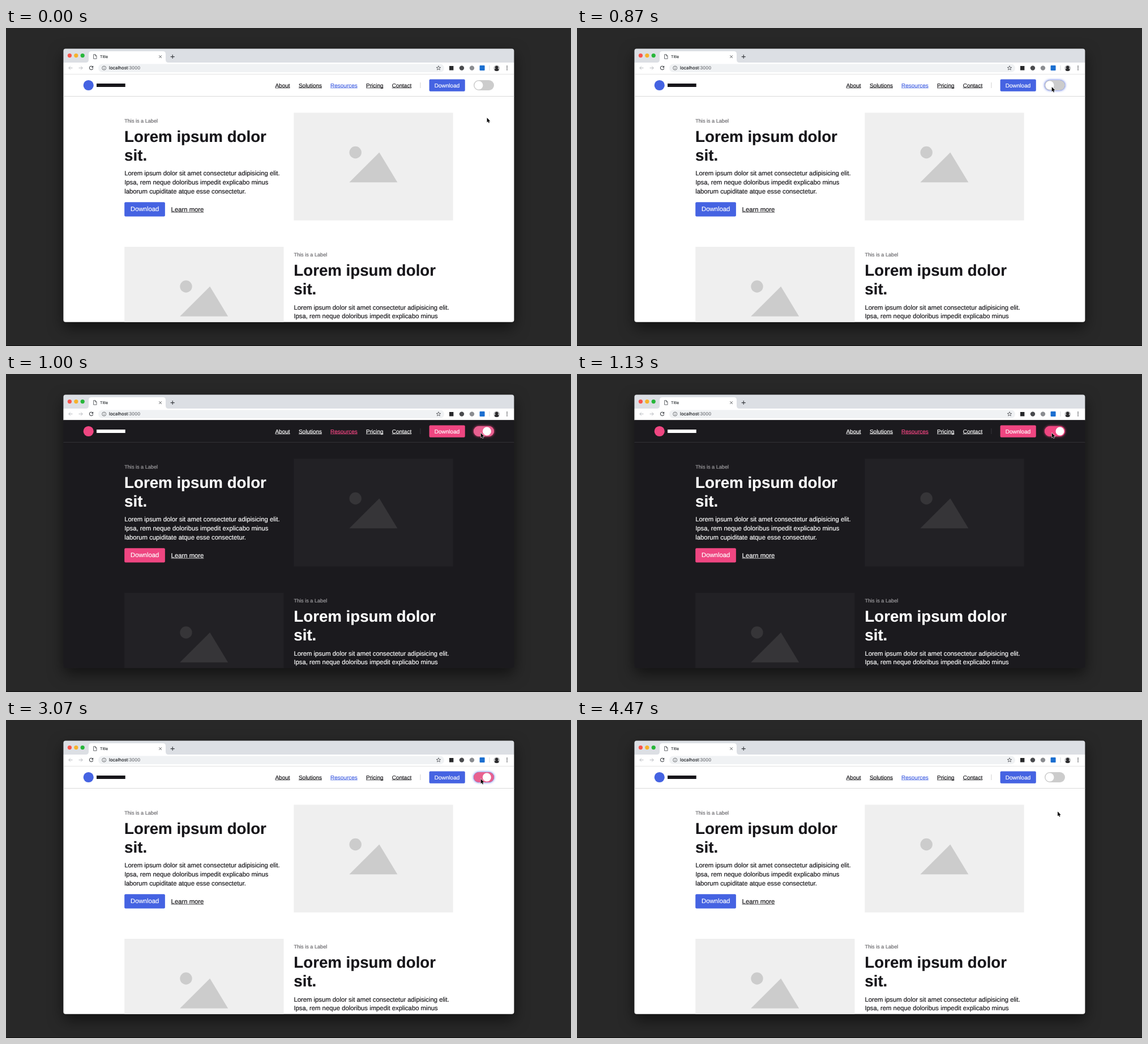
Write an HTML page with a canvas that moves like this. It is 998 px wide and 561 px high and loops after 4800 ms.

```html
<!DOCTYPE html>
<html lang="en">
<head>
<meta charset="utf-8">
<title>Theme toggle</title>
<style>
  html, body { margin: 0; width: 100%; height: 100%; overflow: hidden; background: #282828; }
  canvas { display: block; width: 998px; height: 561px; }
</style>
</head>
<body>
<canvas id="stage" width="998" height="561"></canvas>
<script>
const ctx = document.getElementById('stage').getContext('2d');
const LOOP = 4800, STEP = LOOP / 72, LEAD = 15;
const WIN = [101.4, 36.6, 796, 482.2, 4];
const SANS = '"Liberation Sans", Arial, sans-serif';
const UI = 'Inter, Roboto, sans-serif';

const LIGHT = {
  bg: '#ffffff', text: '#17161a', accent: '#4563e2', label: '#69686c',
  line: '#cccccc', box: '#efefef', shape: '#cccccc'
};
const DARK = {
  bg: '#1b1a1e', text: '#ffffff', accent: '#ef4681', label: '#a09fa2',
  line: '#39383c', box: '#222125', shape: '#363538'
};

const clamp = u => Math.max(0, Math.min(1, u));
const mix = (a, b, u) => a + (b - a) * u;
const inOut = u => u < 0.5 ? 4 * u ** 3 : 1 - 4 * (1 - u) ** 3;

// The CSS "ease" curve, solved by bisection.
function ease(u) {
  let lo = 0, hi = 1, s = 0.5;
  for (let i = 0; i < 20; i++) {
    s = (lo + hi) / 2;
    if (0.75 * s * (1 - s) + s ** 3 < u) lo = s; else hi = s;
  }
  return 0.3 * (1 - s) ** 2 * s + 3 * (1 - s) * s * s + s ** 3;
}

function rect(x, y, w, h, fill, r = 0) {
  ctx.fillStyle = fill;
  ctx.beginPath();
  ctx.roundRect(x, y, w, h, r);
  ctx.fill();
}

function disc(x, y, r, fill) {
  ctx.fillStyle = fill;
  ctx.beginPath();
  ctx.arc(x, y, r, 0, Math.PI * 2);
  ctx.fill();
}

function poly(points, fill) {
  ctx.fillStyle = fill;
  ctx.beginPath();
  points.forEach(([x, y]) => ctx.lineTo(x, y));
  ctx.closePath();
  ctx.fill();
}

function stroke(path, color, width = 1) {
  ctx.strokeStyle = color;
  ctx.lineWidth = width;
  ctx.stroke(new Path2D(path));
}

// A hairline outline gives the slightly heavy look of smoothed desktop text.
function text(str, x, y, size, color, font = SANS, weight = 400) {
  ctx.font = `${weight} ${size}px ${font}`;
  ctx.fillStyle = ctx.strokeStyle = color;
  ctx.lineWidth = 0.18;
  ctx.fillText(str, x, y);
  ctx.strokeText(str, x, y);
  return ctx.measureText(str).width;
}

function link(str, x, y, size, color) {
  const w = text(str, x, y, size, color);
  rect(x, y + size * 0.1, w, 0.85, color);
}

function drawBackdrop() {
  rect(0, 0, 998, 561, '#282828');
  rect(0, 560, 998, 1, '#101010');
  ctx.save();
  ctx.shadowColor = 'rgba(0,0,0,.55)';
  ctx.shadowBlur = 26;
  ctx.shadowOffsetY = 10;
  ctx.fillStyle = '#222';
  ctx.beginPath();
  ctx.roundRect(...WIN);
  ctx.fill();
  ctx.restore();
}

function drawChrome() {
  rect(101, 36, 797, 25, '#dcdfe4');
  rect(101, 61, 797, 20.5, '#ffffff');

  ['#f9544d', '#f6b22b', '#27b73a'].forEach((c, i) => disc(112.4 + i * 11.4, 48.6, 3.6, c));

  ctx.fillStyle = '#ffffff';
  ctx.fill(new Path2D('M141 61Q146 61 146 56V46Q146 41 151 41H277Q282 41 282 46V56Q282 61 287 61Z'));
  stroke('M154.6 46.7H157.8L160 49V54.2H154.6ZM157.6 46.7V49.2H160', '#55585c', 0.9);
  text('Title', 166, 53, 6.9, '#3c4043', UI);
  stroke('M270.4 48.4L274.8 52.8M274.8 48.4L270.4 52.8', '#4a4d51', 1);
  stroke('M290.7 50.6H297.7M294.2 47.1V54.1', '#36393d', 1.1);

  stroke('M117.5 70.5H111M113.9 67.4L110.8 70.5L113.9 73.6', '#b2b5b9', 0.9);
  stroke('M128.5 70.5H135M132.1 67.4L135.2 70.5L132.1 73.6', '#b2b5b9', 0.9);
  stroke('M153.1 68.5A3.2 3.2 0 1 0 153.7 71.2', '#45484c', 1.1);
  poly([[154.2, 66.6], [154.2, 70], [150.8, 70]], '#45484c');

  rect(163, 63.5, 611, 14.5, '#f0f2f4', 7.25);
  stroke('M169.7 70.6A3.5 3.5 0 1 1 176.7 70.6A3.5 3.5 0 1 1 169.7 70.6M173.2 70.1V72.6M173.2 68.4V69.3', '#54575b', 0.8);
  const w = text('localhost', 182, 73.3, 7.8, '#25282c', UI);
  text(':3000', 182 + w, 73.3, 7.8, '#74777c', UI);

  const star = [];
  for (let i = 0; i < 10; i++) {
    const a = i * Math.PI / 5 - Math.PI / 2, r = i % 2 ? 1.7 : 4;
    star.push(`${764 + r * Math.cos(a)} ${70.7 + r * Math.sin(a)}`);
  }
  stroke(`M${star.join('L')}Z`, '#54575b', 0.85);

  rect(783, 67, 7.4, 7.4, '#27282a');
  disc(805, 70.6, 4.2, '#4a4b4e');
  disc(823, 70.6, 4.2, '#8b8d91');
  rect(836.6, 66.1, 9, 9, '#1c6fd0', 1);
  rect(853.6, 66, 0.8, 9, '#d0d2d5');

  // Avatar
  ctx.save();
  ctx.beginPath();
  ctx.arc(866.7, 70.7, 5.3, 0, Math.PI * 2);
  ctx.clip();
  rect(861, 65, 12, 12, '#b9babc');
  disc(866.7, 69.4, 2.7, '#29292b');
  disc(866.7, 76, 4.7, '#29292b');
  ctx.restore();

  [67.4, 70.5, 73.6].forEach(y => disc(885, y, 0.95, '#4a4d51'));
}

function drawToggle(c, on, focus) {
  if (focus) {
    ctx.save();
    ctx.shadowColor = c.accent;
    ctx.shadowBlur = 4;
    rect(826, 92, 36, 18, c.accent, 9);
    ctx.restore();
  }
  const track = [[204, 239], [204, 70], [204, 129]].map(([a, b]) => Math.round(mix(a, b, on)));
  rect(826, 92, 36, 18, `rgb(${track})`, 9);
  disc(mix(835, 853, on), 101, 7.5, '#ffffff');
}

function drawHeader(c) {
  disc(145.7, 101, 9.1, c.accent);
  rect(160, 98, 50.7, 6, c.text);
  const items = [['About', 475.4], ['Solutions', 516.9], ['Resources', 573], ['Pricing', 636], ['Contact', 681.7]];
  for (const [name, x] of items) {
    link(name, x, 104.5, 10, name === 'Resources' ? c.accent : c.text);
  }
  rect(731.5, 96, 0.9, 10, c.line);
  rect(747.6, 90.4, 63.2, 21.4, c.accent, 2);
  text('Download', 756.8, 104.5, 10, '#ffffff');
  rect(101, 120.2, 797, 0.9, c.line);
}

function drawCopy(c, x, y) {
  text('This is a Label', x, y + 166.8, 9.15, c.label);
  text('Lorem ipsum dolor', x - 0.1, y + 201, 27.7, c.text, SANS, 700);
  text('sit.', x - 0.1, y + 234, 27.7, c.text, SANS, 700);
  [
    'Lorem ipsum dolor sit amet consectetur adipisicing elit.',
    'Ipsa, rem neque doloribus impedit explicabo minus',
    'laborum cupiditate atque esse consectetur.'
  ].forEach((line, i) => text(line, x, y + 260.1 + i * 15.9, 11.3, c.text));
  rect(x, y + 307.2, 71.7, 25.4, c.accent, 2);
  text('Download', x + 10.8, y + 323.3, 11.3, '#ffffff');
  link('Learn more', x + 82.4, y + 323.6, 11.3, c.text);
}

function drawPicture(c, x, y) {
  rect(x, y, 281.3, 190, c.box);
  disc(x + 108.8, y + 70, 10.7, c.shape);
  poly([[x + 98, y + 122.8], [x + 151, y + 70], [x + 183, y + 122.8]], c.shape);
}

function drawPage(c) {
  rect(101, 81.2, 797, 438, c.bg);
  drawHeader(c);
  drawCopy(c, 209.2, 0);
  drawPicture(c, 508.4, 149.5);
  drawPicture(c, 209.2, 386);
  drawCopy(c, 508.4, 236.4);
}

function drawCursor(t) {
  const go = inOut(clamp(t / 733));
  const back = inOut(clamp((t - 3225) / 842));
  const x = mix(mix(849.6, 838.7, go), 849, back);
  const y = mix(mix(158.3, 104, go), 161.4, back);
  ctx.save();
  ctx.translate(x, y);
  ctx.lineJoin = 'round';
  const arrow = 'M0 0V8.2L1.9 6.5L3.1 9.4L4.4 8.8L3.2 6.1H5.7Z';
  stroke(arrow, 'rgba(255,255,255,.85)', 1.1);
  ctx.fillStyle = '#000';
  ctx.fill(new Path2D(arrow));
  ctx.restore();
}

function render(now) {
  const t = Math.floor(((now + LEAD) % LOOP) / STEP) * STEP;
  const c = t > 900 && t < 3035 ? DARK : LIGHT;
  const on = t < 3035 ? ease(clamp((t - 900) / 200)) : 1 - ease(clamp((t - 3035) / 200));
  const focus = t > 860 && t < 4460;

  ctx.textRendering = 'geometricPrecision';
  ctx.lineJoin = 'round';
  drawBackdrop();
  ctx.save();
  ctx.beginPath();
  ctx.roundRect(...WIN);
  ctx.clip();
  drawChrome();
  drawPage(c);
  drawToggle(c, on, focus);
  ctx.restore();
  drawCursor(t);
}

const start = performance.now();
function tick() {
  render(performance.now() - start);
  requestAnimationFrame(tick);
}
tick();
</script>
</body>
</html>
```
